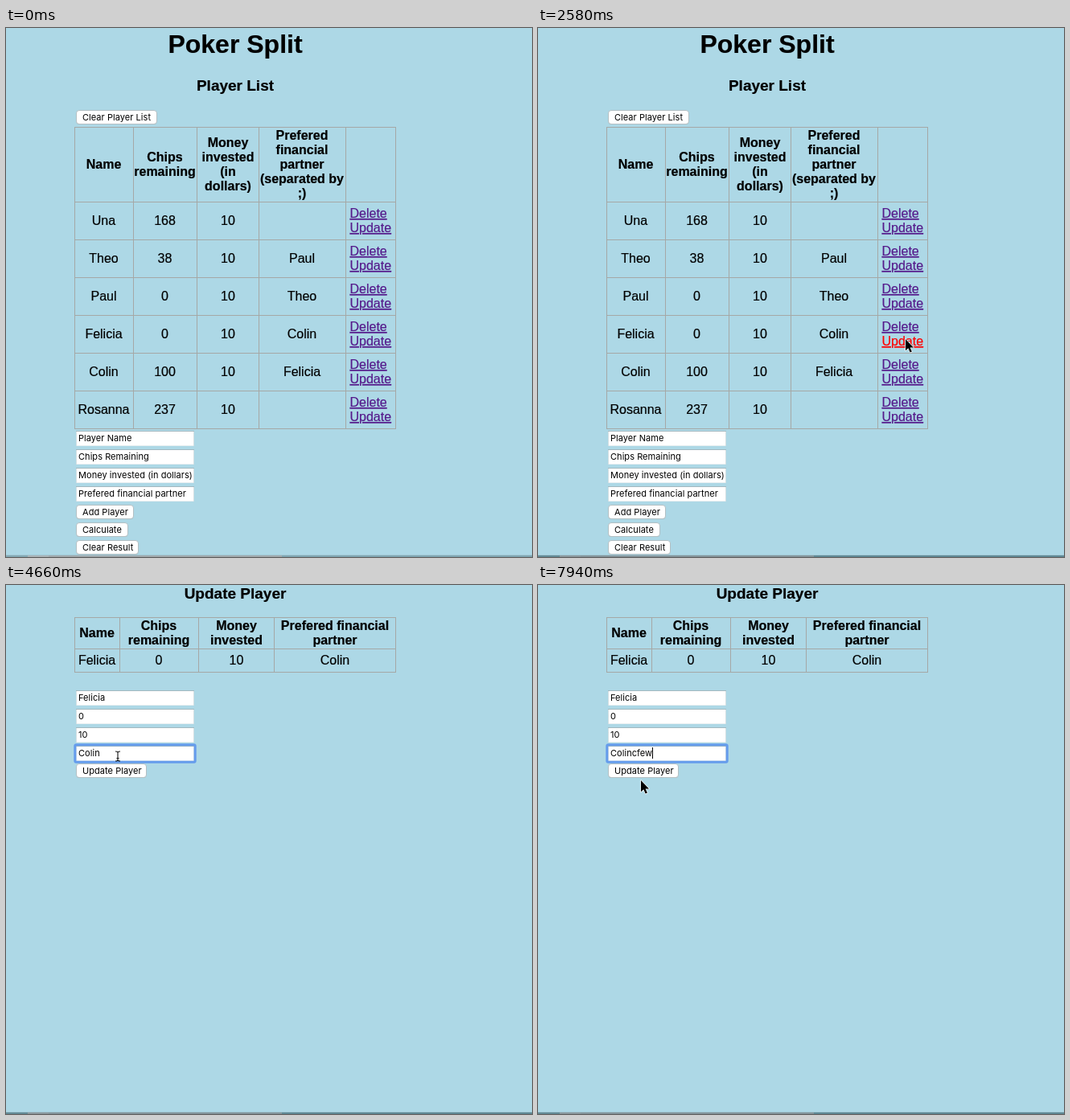
Animation of 654x658 px, one loop 8000 ms. Source, as an HTML page:

```html
<!DOCTYPE html>
<html lang="en">
<head>
<meta charset="utf-8">
<title>Poker Split</title>
<style>
html, body { margin: 0; width: 100%; height: 100%; overflow: hidden; background: #add8e6; }
svg { display: block; font: 16px "Liberation Sans", Arial, sans-serif; font-kerning: none; }
text { fill: currentColor; stroke: currentColor; stroke-width: .2px; }
.mid { text-anchor: middle; }
.bold { font-weight: bold; }
.link { color: #551a8b; text-decoration: underline 1px; }
.ui { font: 11px Inter, Roboto, sans-serif; letter-spacing: .05px; stroke: none; }
.line { fill: #a5a8a6; }
</style>
</head>
<body>
<svg id="stage" width="654" height="658" viewBox="0 0 654 658"></svg>
<script>
const text = (x, y, s, cls = "mid", more = "") => `<text x="${x}" y="${y}" class="${cls}" ${more}>${s}</text>`;
const rect = (x, y, w, h, more) => `<rect x="${x}" y="${y}" width="${w}" height="${h}" ${more}/>`;

const grid = (xs, ys) => {
  const x0 = xs[0], y0 = ys[0], w = xs.at(-1) - x0 + 1, h = ys.at(-1) - y0 + 1;
  return xs.map(x => rect(x, y0, 1, h, 'class="line"')).join("") +
    ys.map(y => rect(x0, y, w, 1, 'class="line"')).join("");
};

// Bold heading lines, 18px apart, centred on a baseline
const head = (x, y, ...lines) => lines.map((s, i) =>
  text(x, y + 18 * i - 9 * (lines.length - 1), s, "mid bold")).join("");

const button = (y, w, label) =>
  rect(87.5, y + .5, w, 17, 'rx="4" fill="#8a9ca3"') +
  rect(87.5, y, w, 17, 'rx="3.5" fill="#fff" stroke="#b3bfc3"') +
  text(95, y + 12.5, label, "ui");

const input = (y, value, id = "") =>
  rect(87, y, 147, 19, 'fill="#d3dfe3"') +
  rect(88, y + 1, 145, 17.5, 'fill="#fff"') +
  rect(87, y, 147, 1, 'fill="#a3b8bf"') +
  text(90, y + 13, value, "ui", id && `id="${id}"`);

const players = [
  ["Una", 168, ""], ["Theo", 38, "Paul"], ["Paul", 0, "Theo"],
  ["Felicia", 0, "Colin"], ["Colin", 100, "Felicia"], ["Rosanna", 237, ""]
];
const picked = 3, [pickName, pickChips, pickMate] = players[picked];

const rows = players.map(([name, chips, mate], i) => {
  const y = 245 + 47 * i;
  return text(121.5, y, name) + text(197.5, y, chips) + text(276, y, 10) + text(368, y, mate) +
    text(427.5, y - 9, "Delete", "link") +
    text(427.5, y + 9, "Update", "link", i === picked ? 'id="pick"' : "");
}).join("");

const listPage = text(285, 31, "Poker Split", "mid bold", 'font-size="32"') +
  text(285, 78, "Player List", "mid bold", 'font-size="19"') +
  button(102.5, 100, "Clear Player List") +
  grid([85, 158, 237, 314, 422, 484], [123, ...Array.from({ length: 7 }, (_, i) => 216 + 47 * i)]) +
  head(121.5, 175, "Name") + head(197.5, 175, "Chips", "remaining") +
  head(276, 175, "Money", "invested", "(in", "dollars)") +
  head(368, 175, "Prefered", "financial", "partner", "(separated by", ";)") + rows +
  ["Player Name", "Chips Remaining", "Money invested (in dollars)", "Prefered financial partner"]
    .map((s, i) => input(501 + 23 * i, s)).join("") +
  button(593.5, 71, "Add Player") + button(615.5, 64, "Calculate") + button(637.5, 77, "Clear Result");

const editPage = text(285, 17, "Update Player", "mid bold", 'font-size="19"') +
  grid([85, 141, 239, 333, 484], [40, 79, 108]) +
  head(113, 65, "Name") + head(190, 65, "Chips", "remaining") +
  head(286.5, 65, "Money", "invested") + head(409, 65, "Prefered financial", "partner") +
  text(113, 99, pickName) + text(190, 99, pickChips) + text(286.5, 99, 10) + text(409, 99, pickMate) +
  input(131, pickName) + input(154, pickChips) + input(177, 10) +
  input(200, pickMate, "field") +
  rect(85.8, 198.8, 149.4, 21.4, 'id="ring" rx="1.5" fill="none" stroke="#659cec" stroke-width="3"') +
  rect(0, 202, 1, 14, 'id="caret"') +
  button(222.5, 87, "Update Player");

const bar = (id, left, tab, mid, right) => `<g id="${id}">` +
  rect(0, 655, 654, 1, 'fill="#a1c8d5"') + rect(0, 656, 27, 2, `fill="${left}"`) +
  rect(27, 656, 26, 2, `fill="${tab}"`) + rect(53, 656, 290, 2, `fill="${mid}"`) +
  rect(343, 656, 311, 2, `fill="${right}"`) + "</g>";

document.getElementById("stage").innerHTML =
  rect(0, 0, 654, 658, 'fill="#add8e6"') +
  `<g id="list">${listPage}</g><g id="edit">${editPage}</g>` +
  bar("barIdle", "#83a8b3", "#a9b3b7", "#a0a9ad", "#7fa5b1") +
  bar("barBusy", "#638b96", "#8b999e", "#84959b", "#5f8995") +
  `<path id="arrow" d="M0 0V14.3L3.3 11.2L5.6 16.6L7.9 15.6L5.6 10.4H10Z"
    stroke="#fff" stroke-width="1.3" paint-order="stroke" stroke-linejoin="round"/>
  <path id="beam" d="M-3 -6Q0 -6 0 -4.5Q0 -6 3 -6M0 -4.5V4.5M-3 6Q0 6 0 4.5Q0 6 3 6M-1.5 2.5H1.5"
    fill="none" stroke="#111" stroke-width="1.1"/>`;

const el = id => document.getElementById(id);
const show = (id, on) => el(id).setAttribute("visibility", on ? "visible" : "hidden");

// Each list holds [start in ms, ...state]; a state lasts until the next start
const at = (list, t) => list.findLast(e => e[0] <= t);
const pointer = [
  [0, "none", 0, 0], [500, "arrow", 489, 392], [800, "arrow", 476, 382], [950, "arrow", 463, 377],
  [1100, "arrow", 457, 387], [3020, "arrow", 362, 333], [3170, "arrow", 87, 154],
  [3470, "beam", 112, 184], [3620, "beam", 131, 206], [3770, "beam", 139, 213],
  [7490, "arrow", 135, 224], [7640, "arrow", 130, 253], [7790, "arrow", 128, 248], [7940, "arrow", 128, 243]
];
const blink = [
  [0, 0], [4060, 1], [4660, 0], [5110, 1], [5560, 0], [6150, 1], [7490, 0], [7940, 1]
];
const typed = [[0, ""], [6600, "c"], [6740, "cfe"], [6890, "cfew"]];

function draw(t) {
  const edit = t >= 2730;
  show("list", !edit);
  show("edit", edit);
  el("pick").style.color = t >= 1540 ? "#f00" : "";
  show("barIdle", t < 1690);
  show("barBusy", t >= 1690);

  const [, kind, x, y] = at(pointer, t);
  for (const id of ["arrow", "beam"]) {
    show(id, kind === id);
    el(id).setAttribute("transform", `translate(${x} ${y})`);
  }

  const field = el("field");
  field.textContent = pickMate + at(typed, t)[1];
  show("ring", edit && t >= 3910);
  show("caret", at(blink, t)[1]);
  el("caret").setAttribute("x", Math.round(90.3 + field.getComputedTextLength()));
}

const start = performance.now();
function tick() {
  draw((performance.now() - start) % 8000);
  requestAnimationFrame(tick);
}
tick();
</script>
</body>
</html>
```
